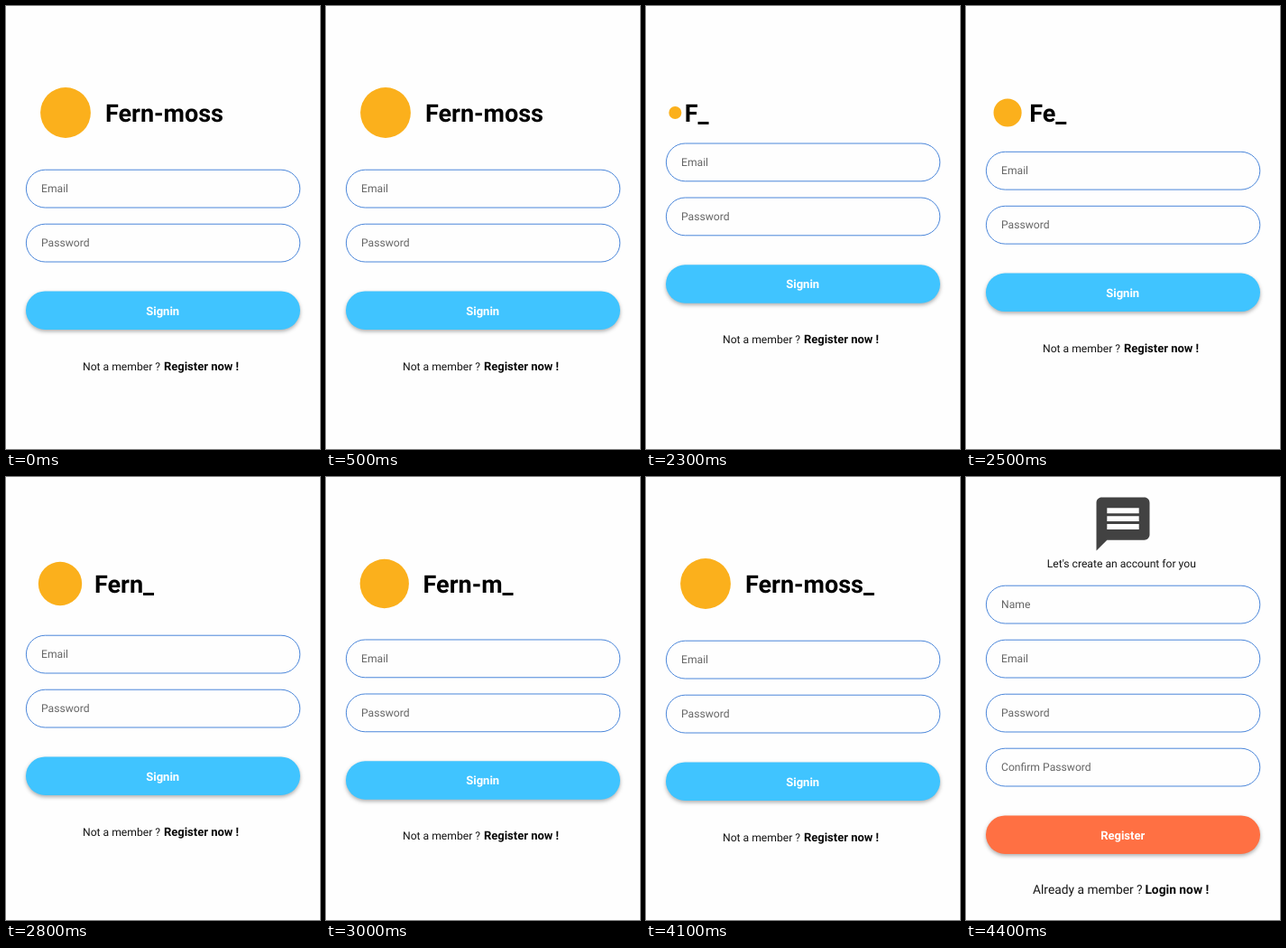
These frames come from a looping animation (348 px wide and 490 px high, 5100 ms). An HTML page:

```html
<!DOCTYPE html>
<html lang="en">
<head>
<meta charset="utf-8">
<title>Sign in</title>
<style>
  html, body { margin: 0; width: 100%; height: 100%; overflow: hidden; background: #fefefe; }
  svg { display: block; font-family: Roboto, sans-serif; text-rendering: geometricPrecision; }
  .pill { fill: none; stroke: #4a86da; stroke-width: 1; }
  .button { filter: drop-shadow(0 2px 2px rgba(0, 0, 0, .32)); }
  .hint { font-size: 12.15px; fill: #666; }
  .label { font-size: 13px; font-weight: 700; fill: #fff; text-anchor: middle; }
  .note { font-size: 12.15px; fill: #161616; }
  .link { font-size: 13px; font-weight: 700; fill: #0a0a0a; }
  .big { font-size: 13.8px; }
  .title { font-size: 27px; font-weight: 700; fill: #000; }
</style>
</head>
<body>
<svg width="348" height="490" viewBox="0 0 348 490">
  <g id="login">
    <circle id="logo" cy="118" fill="#fbb01c"/>
    <text id="title" class="title" y="128"></text>
    <g id="form"></g>
  </g>
  <g id="join">
    <path transform="translate(138.6 16.6) scale(2.95)" fill="#424242" d="M20 2H4c-1.1 0-2 .9-2 2v18l4-4h14c1.1 0 2-.9 2-2V4c0-1.1-.9-2-2-2zm-2 12H6v-2h12zm0-3H6V9h12zm0-3H6V6h12z"/>
    <text class="note" x="172.3" y="99.5" text-anchor="middle">Let's create an account for you</text>
  </g>
</svg>
<script>
const LOOP = 5100, STEP = 100;
const NAME = 'Fern-moss';
const MID = 118, LOGO = 90, ROW_MIN = 31.6, LEFT = 21;

const $ = id => document.getElementById(id);
const login = $('login'), join = $('join'), form = $('form'), logo = $('logo'), title = $('title');

function add(parent, tag, attrs, text = '') {
  const el = document.createElementNS('http://www.w3.org/2000/svg', tag);
  for (const key in attrs) el.setAttribute(key, attrs[key]);
  el.textContent = text;
  parent.append(el);
}

function field(parent, y, hint) {
  add(parent, 'rect', { class: 'pill', x: 22.4, y: y + 0.2, width: 303.4, height: 41.8, rx: 20.9 });
  add(parent, 'text', { class: 'hint', x: 39, y: y + 25 }, hint);
}

function button(parent, y, text, fill) {
  add(parent, 'rect', { class: 'button', x: 22, y, width: 304, height: 42.4, rx: 21.2, fill });
  add(parent, 'text', { class: 'label', x: 173.7, y: y + 26 }, text);
}

function footer(parent, y, x1, text, x2, link, size = '') {
  add(parent, 'text', { class: 'note ' + size, x: x1, y }, text);
  add(parent, 'text', { class: 'link ' + size, x: x2, y }, link);
}

['Email', 'Password'].forEach((hint, i) => field(form, i * 60, hint));
button(form, 134.5, 'Signin', '#40c4ff');
footer(form, 221.7, 85, 'Not a member ?', 174.9, 'Register now !');

['Name', 'Email', 'Password', 'Confirm Password'].forEach((hint, i) => field(join, 120 + i * 60, hint));
button(join, 374.5, 'Register', '#ff7043');
footer(join, 461.4, 74, 'Already a member ?', 198.4, 'Login now !', 'big');

function layout(size, text) {
  const row = Math.max(size, ROW_MIN);
  logo.setAttribute('cx', LEFT + size / 2);
  logo.setAttribute('r', size * 0.31);
  title.setAttribute('x', LEFT + size - 1);
  title.textContent = text;
  form.setAttribute('transform', `translate(0 ${MID + row / 2 + 18})`);
}

// Typewriter: one tick per 150 ms, then the cursor blinks on every other tick.
function typed(t) {
  const n = Math.min(13, Math.floor((t - 2250) / 150) + 1);
  const extra = n - NAME.length;
  return NAME.slice(0, n) + (extra <= 0 || extra % 2 === 0 ? '_' : '');
}

function draw(t) {
  const joining = (t >= 1100 && t < 2300) || t >= 4300;
  login.style.display = joining ? 'none' : '';
  join.style.display = joining ? '' : 'none';
  if (joining) return;
  if (t < 1100) return layout(LOGO, NAME);
  const rest = 1 - Math.min(1, (t - 2165) / 1000);
  layout(LOGO * (1 - rest * rest), typed(t));
}

const start = performance.now();
function tick() {
  const t = (performance.now() - start) % LOOP;
  draw(Math.floor(t / STEP) * STEP);
  requestAnimationFrame(tick);
}
tick();
</script>
</body>
</html>
```
